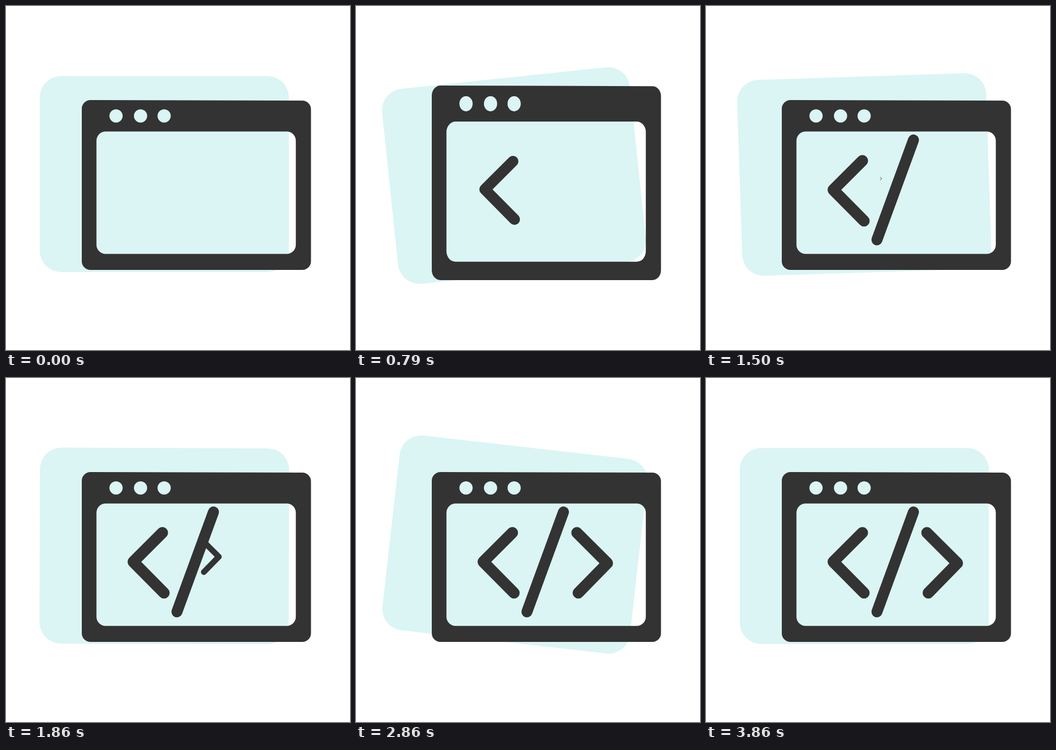
Animation of 640 by 640 pixels, one loop 4.78 s. Source, as an HTML page with a canvas:

```html
<!DOCTYPE html>
<html lang="en">
<head>
<meta charset="utf-8">
<title>Code window</title>
<style>
  html, body { margin: 0; width: 100%; height: 100%; overflow: hidden; background: #fff; }
  canvas { display: block; width: 640px; height: 640px; }
</style>
</head>
<body>
<canvas id="stage" width="640" height="640"></canvas>
<script>
const ctx = document.getElementById('stage').getContext('2d');
const DARK = '#333333';
const LIGHT = '#dbf5f4';
const LOOP = 4780;
const LAST_STEP = 54;
const CENTER = 320;

// Keys are [step, value] pairs, with 14 steps per second.
const TILT = [[0, 0], [11, -6], [25.6, 0], [38.8, 7], [54, 0]];
const STRETCH = [[0, 1], [9.65, 1.169], [19.3, 1]];
const STROKES = [
  { grow: [[0, 0], [11.4, 1]], width: 21, points: [[291, 287.8], [236.7, 342], [294, 399.8]] },
  { grow: [[11.75, 0], [20.5, 1]], width: 20.5, points: [[386, 249.3], [318, 435]] },
  { grow: [[20.5, 0], [31.2, 1]], width: 21, points: [[411, 287.8], [467.7, 344.5], [413.5, 399.8]] }
];

function valueAt(keys, step) {
  if (step <= keys[0][0]) return keys[0][1];
  for (let i = 1; i < keys.length; i++) {
    const [s0, v0] = keys[i - 1];
    const [s1, v1] = keys[i];
    if (step <= s1) return v0 + (v1 - v0) * (step - s0) / (s1 - s0);
  }
  return keys[keys.length - 1][1];
}

// Steps begin on the nearest hundredth of a second.
function stepAt(time) {
  const stepStart = n => Math.round(n * 100 / 14) * 10;
  let step = Math.floor(time * 14 / 1000) + 1;
  while (step > 0 && time < stepStart(step)) step--;
  return Math.min(step, LAST_STEP);
}

function roundedPath(points, radius) {
  const [a, b] = points;
  ctx.moveTo((a[0] + b[0]) / 2, (a[1] + b[1]) / 2);
  for (let i = 1; i <= points.length; i++) {
    const corner = points[i % points.length];
    const next = points[(i + 1) % points.length];
    ctx.arcTo(...corner, ...next, radius);
  }
  ctx.closePath();
}

function drawBackdrop(angle) {
  ctx.save();
  ctx.translate(CENTER, CENTER);
  ctx.rotate(angle * Math.PI / 180);
  ctx.translate(-CENTER, -CENTER);
  ctx.fillStyle = LIGHT;
  ctx.beginPath();
  roundedPath([[62.7, 130.3], [526.3, 130.3], [526.3, 495], [62.7, 495]], 40);
  ctx.fill();
  ctx.restore();
}

function drawWindow(stretch) {
  const anchor = 360.5;
  ctx.save();
  ctx.translate(0, anchor);
  ctx.scale(1, stretch);
  ctx.translate(0, -anchor);
  ctx.fillStyle = DARK;
  ctx.beginPath();
  roundedPath([[141, 175], [567.4, 176], [567.4, 491], [141, 491]], 16);
  roundedPath([[168.3, 233.5], [539.2, 233.5], [539.2, 461.2], [168.3, 461.2]], 17);
  for (const x of [204.7, 250.3, 294.2]) {
    ctx.moveTo(x + 12.3, 204.5);
    ctx.arc(x, 204.5, 12.3, 0, Math.PI * 2);
  }
  ctx.fill('evenodd');
  ctx.restore();
}

function drawStroke({ points, width }, size) {
  if (size <= 0) return;
  ctx.save();
  ctx.translate(CENTER, CENTER);
  ctx.scale(size, size);
  ctx.translate(-CENTER, -CENTER);
  ctx.strokeStyle = DARK;
  ctx.lineWidth = width;
  ctx.lineCap = ctx.lineJoin = 'round';
  ctx.beginPath();
  points.forEach(point => ctx.lineTo(...point));
  ctx.stroke();
  ctx.restore();
}

function render(time) {
  const step = stepAt(time % LOOP);
  ctx.fillStyle = '#fff';
  ctx.fillRect(0, 0, 640, 640);
  drawBackdrop(valueAt(TILT, step));
  drawWindow(valueAt(STRETCH, step));
  for (const stroke of STROKES) drawStroke(stroke, valueAt(stroke.grow, step));
}

const start = performance.now();
function tick() {
  render(performance.now() - start);
  requestAnimationFrame(tick);
}
tick();
</script>
</body>
</html>
```
